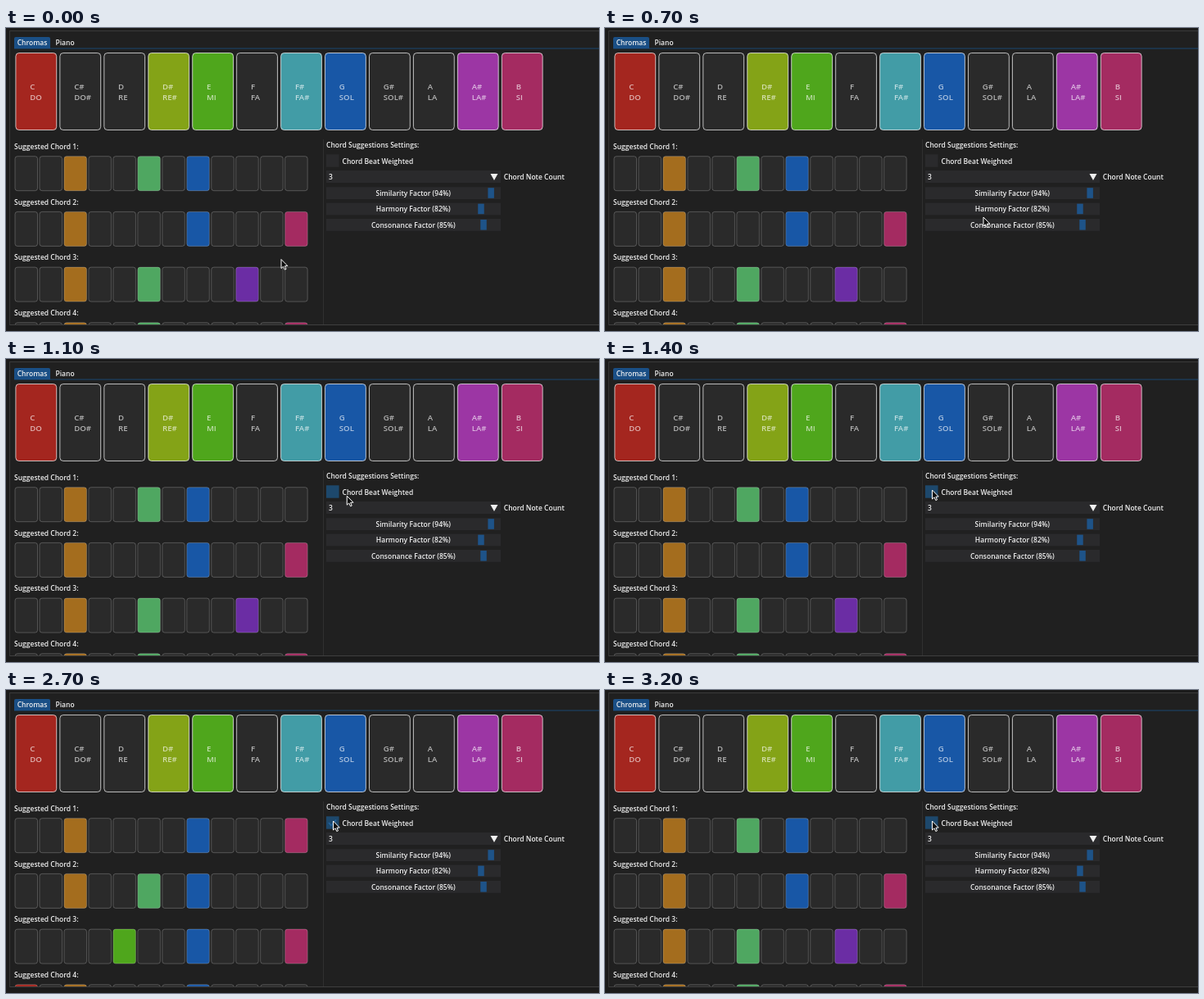
Recreate the animation shown at these times as an HTML page with a canvas. Size 724 px wide and 370 px high, loop 4.2 s.

```html
<!DOCTYPE html>
<html lang="en">
<head>
<meta charset="utf-8">
<title>Chord suggestions</title>
<style>
  html, body { margin: 0; width: 100%; height: 100%; overflow: hidden; background: #1b1b1b; }
  canvas { display: block; }
</style>
</head>
<body>
<canvas width="724" height="370"></canvas>
<script>
const ctx = document.querySelector('canvas').getContext('2d');
const LOOP = 4200, STEP = 100;
const CHECK_AT = 1700, UNCHECK_AT = 3000;
const FONT = '"Open Sans", sans-serif';

const NOTES = ['C DO', 'C# DO#', 'D RE', 'D# RE#', 'E MI', 'F FA',
  'F# FA#', 'G SOL', 'G# SOL#', 'A LA', 'A# LA#', 'B SI'].map(s => s.split(' '));
const COLORS = {
  C: '#a4261f', D: '#a46d1e', 'D#': '#84a317', E: '#4fa61c', F: '#4fa761',
  'F#': '#429ca6', G: '#1857a6', A: '#6b2da4', 'A#': '#9c36a4', B: '#a42b61'
};
const names = s => s.split(' ');
const PLAYED = names('C D# E F# G A# B');
const PLAIN_CHORDS = ['D F G', 'D G B', 'D F A', 'D F B'].map(names);
const WEIGHTED_CHORDS = ['D G B', 'D F G', 'E G B', 'C D G'].map(names);
const FACTORS = { Similarity: 94, Harmony: 82, Consonance: 85 };

// The pointer rests briefly at each stop and eases out into the next one
const STOPS = [
  { t: 0, x: 336, y: 282.5 }, { t: 700, x: 462, y: 231 },
  { t: 900, x: 446, y: 180 }, { t: 1400, x: 399.5, y: 160 }
];

function pointerAt(t) {
  const i = STOPS.findIndex(s => s.t > t);
  if (i < 0) return STOPS[STOPS.length - 1];
  const a = STOPS[i - 1], b = STOPS[i];
  const k = 1 - (1 - (t - a.t) / (b.t - a.t)) ** 2;
  return { x: a.x + (b.x - a.x) * k, y: a.y + (b.y - a.y) * k };
}

function rect(x, y, w, h, fill) {
  ctx.fillStyle = fill;
  ctx.fillRect(x, y, w, h);
}

function box(x, y, w, h, radius, fill, borderAlpha = 0) {
  ctx.beginPath();
  ctx.roundRect(x, y, w, h, radius);
  ctx.fillStyle = fill;
  ctx.fill();
  ctx.strokeStyle = `rgba(255,255,255,${borderAlpha})`;
  ctx.lineWidth = 1;
  ctx.stroke();
}

function poly(points, fill) {
  ctx.beginPath();
  points.forEach(p => ctx.lineTo(...p));
  ctx.closePath();
  ctx.fillStyle = fill;
  ctx.fill();
}

function text(str, x, y, { align = 'left', size = 8.5, color = '#f0f0f0' } = {}) {
  ctx.font = `600 ${size}px ${FONT}`;
  ctx.fillStyle = color;
  ctx.textAlign = align;
  ctx.fillText(str, x, y);
}

function drawWindow() {
  rect(0, 0, 724, 370, '#1b1b1b');
  rect(4, 3, 720, 360, '#202020');
  rect(4, 3, 720, 1, '#3b3b3b');
  rect(4, 362, 720, 1, '#3f3f3f');
  rect(4, 3, 1, 360, '#353535');
  rect(387, 136, 1, 226, '#303030');
  rect(10, 24.5, 714, 1, '#1b4670');
  box(10, 11, 44, 14, [2, 2, 0, 0], '#1a4f86');
  text('Chromas', 32, 21, { align: 'center' });
  text('Piano', 60.5, 21);
}

function drawNotes() {
  NOTES.forEach(([name, solfege], i) => {
    const x = 11.9 + 53.95 * i;
    const label = { size: 9.6, color: 'rgba(255,255,255,.65)' };
    box(x, 30.5, 49.8, 94, 4, PLAYED.includes(name) ? COLORS[name] : '#2a2a2a', .69);
    text(name, x + 17.3, 74.5, label);
    text(solfege, x + 17.3, 87.5, label);
  });
}

function drawChords(chords) {
  ctx.save();
  ctx.beginPath();
  ctx.rect(4, 130, 383, 232);
  ctx.clip();
  chords.forEach((chord, row) => {
    const y = 67.7 * row;
    text(`Suggested Chord ${row + 1}:`, 10, 147.8 + y);
    NOTES.forEach(([name], i) =>
      box(11 + 29.97 * i, 156.7 + y, 27.5, 42, 3, chord.includes(name) ? COLORS[name] : '#2a2a2a', .22));
  });
  ctx.restore();
}

function drawSettings(pointer, checked) {
  // Frame background, highlighted while the pointer is over the widget
  const frame = (y, h, w = 213, hitWidth = w) => {
    const dx = pointer.x - 391, dy = pointer.y - y;
    const hover = dx >= 0 && dx < hitWidth && dy >= 0 && dy < h;
    rect(391, y, w, h, hover ? '#1d486c' : '#2a2a2c');
  };

  text('Chord Suggestions Settings:', 391, 146);

  frame(154.3, 15.4, 15.6, 106);
  if (checked) {
    ctx.beginPath();
    ctx.moveTo(394, 162);
    ctx.lineTo(397, 165.5);
    ctx.lineTo(403, 158.5);
    ctx.strokeStyle = '#22629c';
    ctx.lineWidth = 1.7;
    ctx.stroke();
  }
  text('Chord Beat Weighted', 410.5, 165.5);

  frame(174, 15);
  text('3', 394, 185);
  poly([[591.5, 178], [600.5, 178], [596, 186]], '#f0f0f0');
  text('Chord Note Count', 607.8, 185);

  Object.entries(FACTORS).forEach(([name, value], i) => {
    const y = 194.2 + 19.4 * i;
    frame(y, 14.8);
    // The sliders run from -100% to 100%
    rect(391.5 + 203 * (100 + value) / 200, y + 1, 7.5, 12.6, '#1e5388');
    text(`${name} Factor (${value}%)`, 497.3, y + 10.6, { align: 'center' });
  });
}

function drawPointer({ x, y }) {
  ctx.save();
  ctx.translate(x, y);
  poly([[0, 0], [0, 11], [2.5, 8.8], [4.3, 12.6], [6, 11.9], [4.4, 8.2], [7.8, 8]], '#0c0c0c');
  ctx.strokeStyle = '#fff';
  ctx.lineWidth = 1;
  ctx.stroke();
  ctx.restore();
}

function render(now) {
  const t = Math.floor(now % LOOP / STEP) * STEP;
  const checked = t >= CHECK_AT && t < UNCHECK_AT;
  const pointer = pointerAt(t);
  drawWindow();
  drawNotes();
  drawChords(checked ? WEIGHTED_CHORDS : PLAIN_CHORDS);
  drawSettings(pointer, checked);
  drawPointer(pointer);
}

const start = performance.now();
(function loop() {
  render(performance.now() - start);
  requestAnimationFrame(loop);
})();
</script>
</body>
</html>
```
